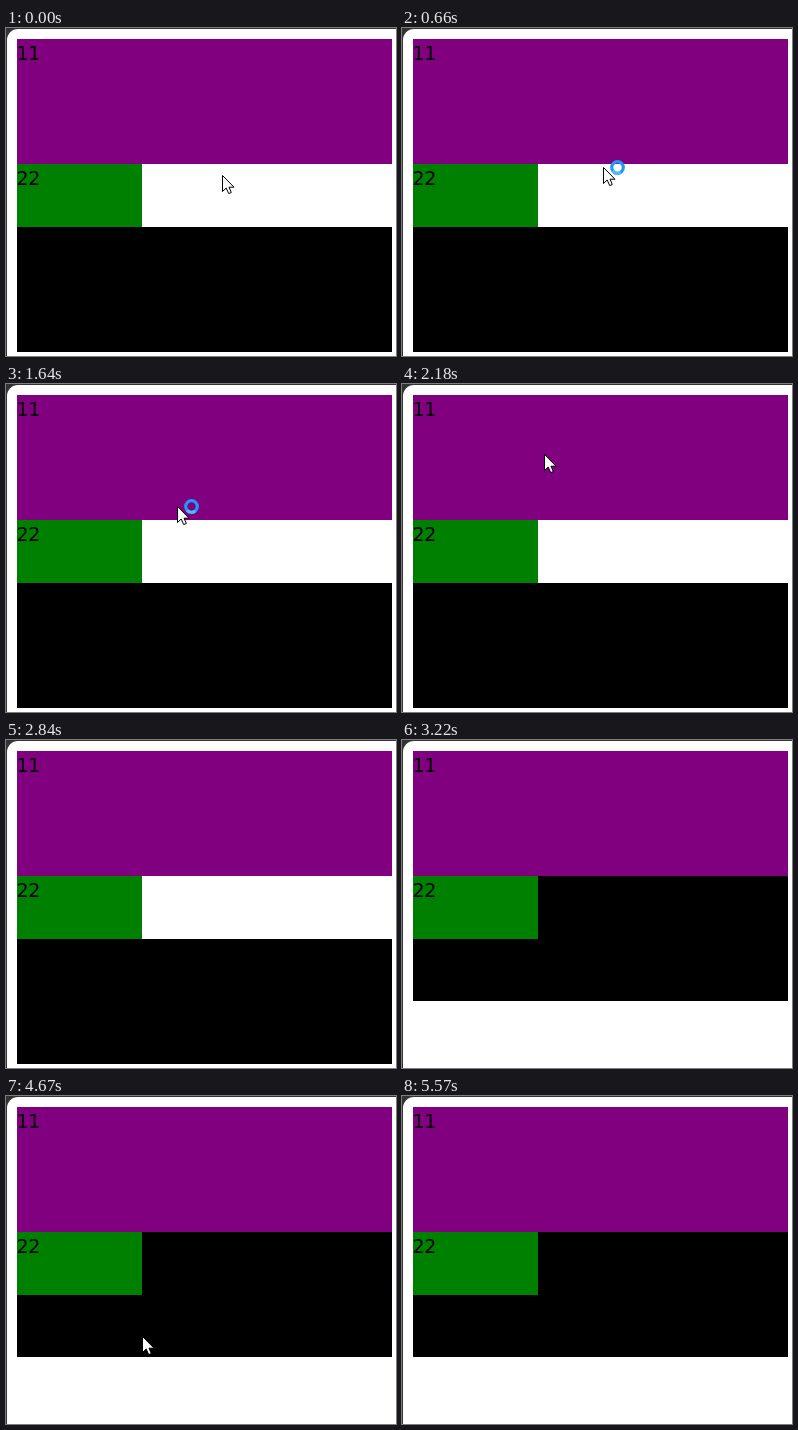
An HTML page for the animation above (6170 ms loop, 390x328 px).

```html
<!DOCTYPE html>
<html lang="en">
<head>
<meta charset="utf-8">
<title>Block layout</title>
<style>
  html, body { margin: 0; width: 100%; height: 100%; overflow: hidden; background: #333; }
  svg { display: block; width: 390px; height: 328px; }
  text { font: 19px "DejaVu Sans", sans-serif; letter-spacing: -.4px; }
</style>
</head>
<body>
<svg viewBox="0 0 390 328">
  <path d="M1 328V12A11 11 0 0 1 12 1H390V328Z" fill="#fff"/>
  <rect id="black" x="11" y="199" width="375" height="125"/>
  <rect x="11" y="11" width="375" height="125" fill="purple"/>
  <rect x="11" y="136" width="125" height="63" fill="green"/>
  <text x="10.5" y="32">11</text>
  <text x="10.5" y="157">22</text>
  <g id="cursor">
    <path d="M.5 -.5V15.5L4.2 12L6.7 17.6L9.3 16.5L7 11.2H12Z" fill="#fff" stroke="#000"/>
    <g id="ring" fill="none" stroke-width="3.2">
      <circle cx="14.5" cy="-.5" r="5.8" stroke="#2098f4"/>
      <path id="glint" d="M14.5 -6.3A5.8 5.8 0 0 0 8.7 -.5" stroke="#50bcf8"/>
    </g>
  </g>
</svg>
<script>
const LOOP = 6170, SWAP = 3220;
const busy = t => t >= 600 && t < 2080;

// Pointer strokes: each glides from the last position to (x, y).
// pow eases out, bow bends the stroke sideways.
const origin = { x: 216, y: 148 };
const strokes = [
  { from: 220, to: 850, x: 194, y: 137 },
  { from: 930, to: 1560, x: 174, y: 125, bow: -2 },
  { from: 1560, to: 1830, x: 163, y: 117 },
  { from: 1980, to: 2600, x: 113, y: -8, pow: 1.16, bow: -3 },
  { from: 2600, to: 2840, x: 110, y: -20 },
  { from: 3330, to: 3760, x: 144, y: 84 },
  { from: 3845, to: 4430, x: 155, y: 198, pow: 2.7, bow: 9 },
  { from: 4515, to: 5130, x: 117, y: 278, pow: 2.6, bow: 1 },
  { from: 5130, to: 5570, x: 116, y: 331 }
];

const $ = id => document.getElementById(id);
const black = $("black"), cursor = $("cursor"), ring = $("ring"), glint = $("glint");

function pointAt(t) {
  let { x, y } = origin;
  for (const { from, to, x: endX, y: endY, pow = 1, bow = 0 } of strokes) {
    if (t < from) break;
    const k = Math.min(1, (t - from) / (to - from));
    const e = 1 - (1 - k) ** pow;
    x += (endX - x) * e + bow * 4 * e * (1 - e);
    y += (endY - y) * e;
  }
  return [Math.round(x), Math.round(y)];
}

function draw(t) {
  black.setAttribute("y", t < SWAP ? 199 : 136);
  cursor.setAttribute("transform", `translate(${pointAt(t)})`);
  ring.setAttribute("visibility", busy(t) ? "visible" : "hidden");
  glint.setAttribute("transform", `rotate(${t * .36} 14.5 -.5)`);
}

const start = performance.now();
function tick() {
  draw((performance.now() - start) % LOOP);
  requestAnimationFrame(tick);
}
tick();
</script>
</body>
</html>
```
